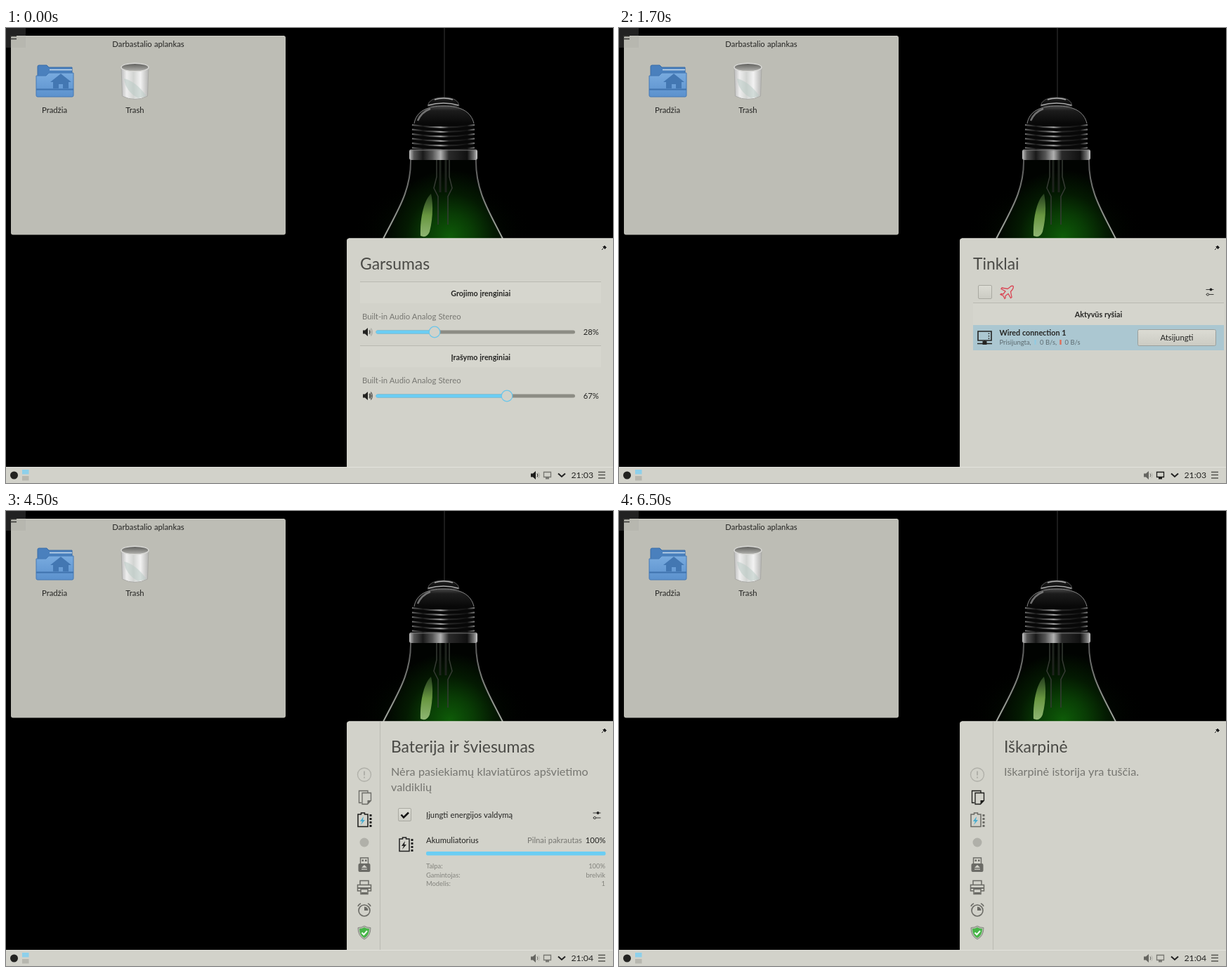
Write an HTML page that moves like this. It is 864x648 px and loops after 8000 ms.

```html
<!DOCTYPE html>
<html lang="lt">
<head>
<meta charset="utf-8">
<title>Darbastalis</title>
<style>
html, body { margin: 0; width: 100%; height: 100%; overflow: hidden; background: #000; }
svg { display: block; width: 864px; height: 648px; }
text { font: 11.3px Lato, "Open Sans", sans-serif; fill: #252523; word-spacing: .02em; }
.h { font-size: 22.9px; fill: #4a4a46; }
.sub { font-size: 16.2px; fill: #767671; }
.b { font-weight: bold; font-size: 10.75px; }
.g { fill: #777772; }
.s { font-size: 9.4px; fill: #83837d; }
.rate { font-size: 9.4px; fill: #5d6b70; }
.mid { text-anchor: middle; }
.end { text-anchor: end; }
.line { fill: none; stroke: currentColor; }
.fill { fill: currentColor; }
</style>
</head>
<body>
<svg viewBox="0 0 864 648">
<defs>
  <linearGradient id="metal" gradientUnits="userSpaceOnUse" x1="574" x2="671">
    <stop offset="0" stop-color="#c4c4c4"/><stop offset=".07" stop-color="#555"/>
    <stop offset=".2" stop-color="#1a1a1a"/><stop offset=".34" stop-color="#555"/>
    <stop offset=".46" stop-color="#b0b0b0"/><stop offset=".58" stop-color="#2a2a2a"/>
    <stop offset=".85" stop-color="#111"/><stop offset=".95" stop-color="#777"/><stop offset="1" stop-color="#ccc"/>
  </linearGradient>
  <linearGradient id="dome" x2="0" y2="1">
    <stop offset="0" stop-color="#4a4a4a"/><stop offset=".25" stop-color="#1c1c1c"/><stop offset="1" stop-color="#060606"/>
  </linearGradient>
  <linearGradient id="rim" x2="0" y2="1">
    <stop offset="0" stop-color="#555"/><stop offset="1" stop-color="#a5aaa2"/>
  </linearGradient>
  <linearGradient id="leaf" x2="0" y2="1">
    <stop offset="0" stop-color="#4c6b3c" stop-opacity=".5"/><stop offset=".5" stop-color="#67963f"/><stop offset="1" stop-color="#8fb673"/>
  </linearGradient>
  <radialGradient id="glow" gradientUnits="userSpaceOnUse" cx="632" cy="298" r="96">
    <stop offset="0" stop-color="#0e5c08"/><stop offset=".35" stop-color="#093c05"/>
    <stop offset=".65" stop-color="#041a02"/><stop offset="1" stop-color="#010301"/>
  </radialGradient>
  <radialGradient id="halo">
    <stop offset="0" stop-color="#0a3d06" stop-opacity=".6"/><stop offset="1" stop-color="#000" stop-opacity="0"/>
  </radialGradient>
  <linearGradient id="button" x2="0" y2="1">
    <stop offset="0" stop-color="#dcdcd4"/><stop offset="1" stop-color="#cbcbc3"/>
  </linearGradient>
  <linearGradient id="blue" x2="0" y2="1">
    <stop offset="0" stop-color="#79abdf"/><stop offset="1" stop-color="#5b91cd"/>
  </linearGradient>
  <linearGradient id="tin">
    <stop offset="0" stop-color="#bbb"/><stop offset=".2" stop-color="#eee"/><stop offset=".45" stop-color="#d2d4d2"/>
    <stop offset=".7" stop-color="#f2f2f2"/><stop offset="1" stop-color="#b4b4b2"/>
  </linearGradient>
  <linearGradient id="mouth" x2="0" y2="1">
    <stop offset="0" stop-color="#5c5c59"/><stop offset="1" stop-color="#b5b5b1"/>
  </linearGradient>
  <g id="sliders">
    <path d="M-5.5-3.5h11M-5.5 3.5h11" stroke="#3b3b38"/>
    <circle cx="1.5" cy="-3.5" r="1.9" fill="#222"/>
    <circle cx="-3" cy="3.5" r="1.6" fill="#d2d2ca" stroke="#3b3b38"/>
  </g>
  <g id="speaker">
    <path class="fill" d="M-6-2.5h3l4-3.5v12l-4-3.5h-3z"/>
    <path class="line" d="M3-2.5q2 2.5 0 5"/>
  </g>
  <g id="battery">
    <path class="line" stroke-width="1.5" d="M-9-8h4.500v-2h5v2h4.500v17.500h-14z"/>
    <path class="line" stroke-width="3" stroke-dasharray="3 2" d="M9-8v18"/>
  </g>
  <path id="bolt" d="M0-5l-5 7h3l-2 5 6-7h-3z"/>
</defs>

<!-- wallpaper -->
<ellipse cx="622" cy="290" rx="130" ry="75" fill="url(#halo)"/>
<path d="M624 0v99" stroke="#252525" stroke-width="1.5"/>
<path d="M576 187C577 232 556 262 537 300H707C688 262 668 232 669 187z" fill="url(#glow)"/>
<path d="M576 187C577 232 556 262 537 300M669 187C668 232 688 262 707 300" fill="none" stroke="url(#rim)" stroke-width="2"/>
<g fill="none" stroke="#363b34" stroke-width="1.5">
  <path d="M613 188v24l-4 16 6 12v40M631 188v24l4 16-6 12v40"/>
  <path d="M618 188v46M626 188v46" stroke="#1e231d" stroke-width="3"/>
</g>
<path d="M605 236C594 246 589 274 590 296Q599 300 603 290C608 270 608 250 605 236z" fill="url(#leaf)"/>
<path d="M600 111Q602 99 623 99T645 111z" fill="url(#dome)" stroke="#555"/>
<path d="M610 102q13-4 26 0M601 110q22-6 43 0" fill="none" stroke="#aaa" stroke-width="1.5"/>
<path d="M580 138C582 119 598 111 623 111S664 119 667 138z" fill="url(#dome)"/>
<path d="M581 136C584 119 599 111 623 111S662 119 666 136" fill="none" stroke="#808080"/>
<path d="M604 115q-13 5-18 17" fill="none" stroke="#999" stroke-width="2.5" opacity=".7"/>
<path d="M580 136h86v38h-86z" fill="#080808"/>
<g id="thread" fill="none" stroke="url(#metal)" stroke-width="2.2"></g>
<rect x="574" y="173" width="97" height="15" rx="3" fill="url(#metal)"/>
<path d="M576 174h93" stroke="#777"/>

<!-- desktop folder -->
<path d="M0 0h28v28H0z" fill="#222"/>
<rect x="7" y="11" width="391" height="283.5" rx="3" fill="#bdbdb5"/>
<path d="M9 11.5h387" stroke="#cfcfc7"/>
<path d="M7 11h21v17H7z" fill="#555" opacity=".06"/>
<path d="M6 11.5h9M6 15.5h9" stroke="#353533" stroke-width="1.3"/>
<text class="mid" x="202.5" y="27">Darbastalio aplankas</text>
<path d="M45 70V55q0-2 2-2h11l3 3h33v14z" fill="#4a80bd" stroke="#366ba7"/>
<path d="M62 59.5h32" stroke="#c9dbec" stroke-width="1.5"/>
<path d="M43 68h14l4-4h35v32q0 2-2 2H45q-2 0-2-2z" fill="url(#blue)" stroke="#4479b5"/>
<path d="M78 65l15 12h-4v9h-8v-6h-6v6h-8v-9h-4z" fill="#4377b2"/>
<path d="M43 87.5h53" stroke="#3f73ae" stroke-width="2"/>
<text class="mid" x="69" y="121">Pradžia</text>
<path d="M164 56l1.500 41q18 9 36 0l1.500-41z" fill="url(#tin)" stroke="#a9a9a5"/>
<path d="M168 72q17 4 32 25l-12 3q-18-10-20-28z" fill="#b9cac5" opacity=".55"/>
<ellipse cx="183.5" cy="56" rx="19.5" ry="5.8" fill="url(#mouth)" stroke="#d9d9d6" stroke-width="1.5"/>
<text class="mid" x="183.5" y="121">Trash</text>

<!-- popup -->
<path d="M485 626V303q0-3.5 3.5-3.5H864V626z" fill="#d2d2ca"/>
<path d="M488 300h376" stroke="#deded7"/>
<path d="M848 316l2.500-2.500M849.500 311.500l3.500 3.500M850 312l2-2 2.500 2.500-2 2z" stroke="#222" fill="#222"/>

<g class="scene">
  <text class="h" x="504" y="344">Garsumas</text>
  <g id="volumes"></g>
</g>

<g class="scene">
  <text class="h" x="504" y="344">Tinklai</text>
  <rect x="511.5" y="366.5" width="19" height="19" rx="1.5" fill="url(#button)" stroke="#a9a9a1"/>
  <path d="M561 367.5q-3-1-5 2l-3 2-8-1.5-1 1.5 6 3.5-3 4-3-.5-1 1 4 2 2 4 1-1v-3l4-3 3.5 6 1.5-1-1.500-8 2.500-3q2-3 1-5z" fill="none" stroke="#da4453" stroke-width="1.3"/>
  <use href="#sliders" x="841" y="376"/>
  <path d="M504 391.5h357" stroke="#b9b9b1"/>
  <path d="M504 392h357v31H504z" fill="#d5d5cd"/>
  <text class="b mid" x="682.5" y="411.5">Aktyvūs ryšiai</text>
  <path d="M504 423h357v36H504z" fill="#abc7d1"/>
  <path d="M511 432h19v13h-19zM520.5 445v4M510 449.5h21" fill="none" stroke="#242422" stroke-width="1.6"/>
  <path d="M517.5 446h6v5h-6z" fill="#242422"/>
  <path d="M526.5 434.5v9" stroke="#242422" stroke-width="1.5" stroke-dasharray="1.5 2"/>
  <text class="b" x="541.5" y="438">Wired connection 1</text>
  <text class="rate" x="541.5" y="450.5">Prisijungta,</text>
  <text class="rate" x="599" y="450.5">0 B/s,</text>
  <text class="rate" x="634.5" y="450.5">0 B/s</text>
  <path d="M592.5 444v7" stroke="#8fcbe4" stroke-width="2"/>
  <path d="M628.5 444v7" stroke="#e0705c" stroke-width="2.5"/>
  <rect x="738.5" y="429.5" width="111" height="23" rx="2" fill="url(#button)" stroke="#9a9f9c"/>
  <text class="mid" x="794" y="444.5">Atsijungti</text>
</g>

<g class="scene">
  <text class="h" x="548" y="344">Pranešimai apie įrenginius</text>
  <text class="sub" x="548" y="380">Įrenginių nėra</text>
</g>

<g class="scene">
  <text class="h" x="548" y="344">Baterija ir šviesumas</text>
  <text class="sub" x="548" y="377">Nėra pasiekiamų klaviatūros apšvietimo</text>
  <text class="sub" x="548" y="398.5">valdiklių</text>
  <rect x="558.5" y="423.5" width="18" height="18" rx="1.5" fill="url(#button)" stroke="#a9a9a1"/>
  <path d="M562.5 432.5l3.5 4 7-7" fill="none" stroke="#111" stroke-width="2.5"/>
  <text x="598" y="437">Įjungti energijos valdymą</text>
  <use href="#sliders" x="841" y="433.5"/>
  <g color="#222"><use href="#battery" x="569" y="475"/><use href="#bolt" class="fill" x="568" y="475"/></g>
  <text x="598" y="472.5">Akumuliatorius</text>
  <text class="g end" x="820" y="472.5">Pilnai pakrautas</text>
  <text class="end" x="853.5" y="472.5">100%</text>
  <rect x="598" y="485" width="255.5" height="5.5" rx="2" fill="#6bcdf3"/>
  <text class="s" x="598" y="509">Talpa:</text><text class="s end" x="853" y="509">100%</text>
  <text class="s" x="598" y="521.5">Gamintojas:</text><text class="s end" x="853" y="521.5">brelvik</text>
  <text class="s" x="598" y="534">Modelis:</text><text class="s end" x="853" y="534">1</text>
</g>

<g class="scene">
  <text class="h" x="548" y="344">Iškarpinė</text>
  <text class="sub" x="548" y="377">Iškarpinė istorija yra tuščia.</text>
</g>

<!-- sidebar -->
<g id="side">
  <path d="M532.5 300v326" stroke="#bbbbb3"/>
  <g class="icon" transform="translate(510 375.5)">
    <circle class="line" r="9.5" stroke-width="1.3"/><path class="line" stroke-width="2" d="M0-5v6M0 3v2"/>
  </g>
  <g class="icon" transform="translate(510 408)">
    <path class="line" stroke-width="1.3" d="M-4 7.5h-3.5v-17H5v3M-3-6.500H9.500v11l-5 5H-3z"/><path class="fill" d="M9.500 4h-5v6z"/>
  </g>
  <g class="icon" transform="translate(510 440)">
    <use href="#battery"/><use href="#bolt" x="-1" fill="#48aed1"/>
  </g>
  <g class="icon" transform="translate(510 472)"><circle class="fill" r="6.5"/></g>
  <g class="icon" transform="translate(510 504)">
    <rect class="fill" x="-8.5" y="-2" width="17" height="12" rx="2"/>
    <path class="line" stroke-width="1.4" d="M-5.500-2v-8h11v8"/><path class="fill" d="M-3.500-7.500h2.500v2.500h-2.500zM1-7.500h2.500v2.500h-2.500z"/>
    <path d="M0 0l4 4h-8zM-4 5.500h8v1.300h-8z" fill="#d2d2ca"/>
  </g>
  <g class="icon" transform="translate(510 536)">
    <path class="line" stroke-width="1.5" d="M-6-4v-5.500H6V-4M-5 5h-4.500v-8.500h19V5H5M-5 2.500H5v7H-5z"/><path class="fill" d="M-9 0H9v2H-9zM-4 7h8v2h-8z"/>
  </g>
  <g class="icon" transform="translate(510 568)">
    <circle class="line" cy="1" r="8" stroke-width="1.6"/><path class="fill" d="M0 1v-5.500A5.500 5.500 0 0 1 5.500 1z"/>
    <path class="line" stroke-width="1.8" d="M-9-5q1-3 4-4M9-5Q8-8 5-9"/>
  </g>
  <g transform="translate(510 600.5)">
    <path d="M0-9.500q4 2.500 9 2.500Q9 5 0 9.500-9 5-9-7-4-7 0-9.500z" fill="#b9bdb3" stroke="#83877f"/>
    <path d="M0-7.500q3 2 7 2Q7 4 0 7.500-7 4-7-5.500-3-5.500 0-7.500z" fill="#47b648"/>
    <path d="M-3.500 0l2.800 2.800L4-2.500" fill="none" stroke="#fff" stroke-width="2"/>
  </g>
</g>

<!-- taskbar -->
<path d="M0 625h864v23H0z" fill="#d2d2ca"/>
<path d="M0 625.5h864" stroke="#e2e2dc"/>
<circle cx="11.5" cy="637" r="5.5" fill="#232321"/>
<path d="M23 629h9.500v6.500H23z" fill="#8dd0eb"/><path d="M23 638h9.500v6.500H23z" fill="#b7b7af"/>
<g id="sound"><use href="#speaker" x="753" y="637"/><path class="line" opacity=".25" d="M758 633q3 4 0 8"/></g>
<g id="net">
  <path class="line" stroke-width="1.3" d="M765.5 632.5h10v7h-10zM770.5 640v2"/><path class="fill" d="M768 640h5v2.500h-5z"/>
</g>
<path d="M786 634.5l5 4.500 5-4.500" fill="none" stroke="#222" stroke-width="2"/>
<text id="clock" class="mid" x="820.3" y="640.5" style="font-size:12.3px"></text>
<path d="M843 632.5h10M843 636.5h10M843 641h10" stroke="#555550" stroke-width="1.3"/>
</svg>
<script>
const $ = id => document.getElementById(id);
const starts = [0, 500, 2500, 4500, 6500];
const activeIcon = [-1, -1, 4, 2, 1];
const scenes = document.querySelectorAll('.scene');
const icons = document.querySelectorAll('.icon');

function volume(y, title, percent, knob, waves) {
  return `<path d="M504 ${y + .5}h343" stroke="#b9b9b1"/>
    <path d="M504 ${y + 1}h343v30H504z" fill="#d6d6ce"/>
    <text class="b mid" x="675.8" y="${y + 20.5}">${title}</text>
    <text class="g" x="507" y="${y + 53.5}">Built-in Audio Analog Stereo</text>
    <g color="#232321"><use href="#speaker" x="514" y="${y + 72}"/>
    <path class="line" opacity="${waves}" d="M518 ${y + 68}q3 4 0 8M519.5 ${y + 66.5}q3.5 5.5 0 11"/></g>
    <rect x="526.5" y="${y + 69.5}" width="283.5" height="5" rx="2.5" fill="#8c8c84"/>
    <rect x="526.5" y="${y + 69.5}" width="${knob - 526.5}" height="5" rx="2.5" fill="#6bcdf3"/>
    <circle cx="${knob}" cy="${y + 72}" r="7.8" fill="#d2d2ca" stroke="#6bc6ea" stroke-width="1.2"/>
    <text class="end" x="843.8" y="${y + 76}">${percent}%</text>`;
}
$('volumes').innerHTML = volume(361, 'Grojimo įrenginiai', 28, 610, .3) + volume(452, 'Įrašymo įrenginiai', 67, 713, 1);

let rings = '';
for (let y = 138; y < 172; y += 6.5) rings += `<path d="M578 ${y}q45 7 89 0"/>`;
$('thread').innerHTML = rings;

function draw() {
  const time = performance.now() % 8000;
  const now = starts.findLastIndex(s => time >= s);
  scenes.forEach((s, i) => s.style.display = i === now ? '' : 'none');
  $('side').style.display = now > 1 ? '' : 'none';
  icons.forEach((icon, i) => {
    const idle = i === 0 || i === 3 ? '#b0b0a9' : '#6b6b66';
    icon.style.color = i === activeIcon[now] ? '#1d1d1b' : idle;
  });
  $('sound').style.color = now === 0 ? '#1d1d1b' : '#666661';
  $('net').style.color = now === 1 ? '#1d1d1b' : '#777772';
  $('clock').textContent = now < 2 ? '21:03' : '21:04';
  requestAnimationFrame(draw);
}
draw();
</script>
</body>
</html>
```
